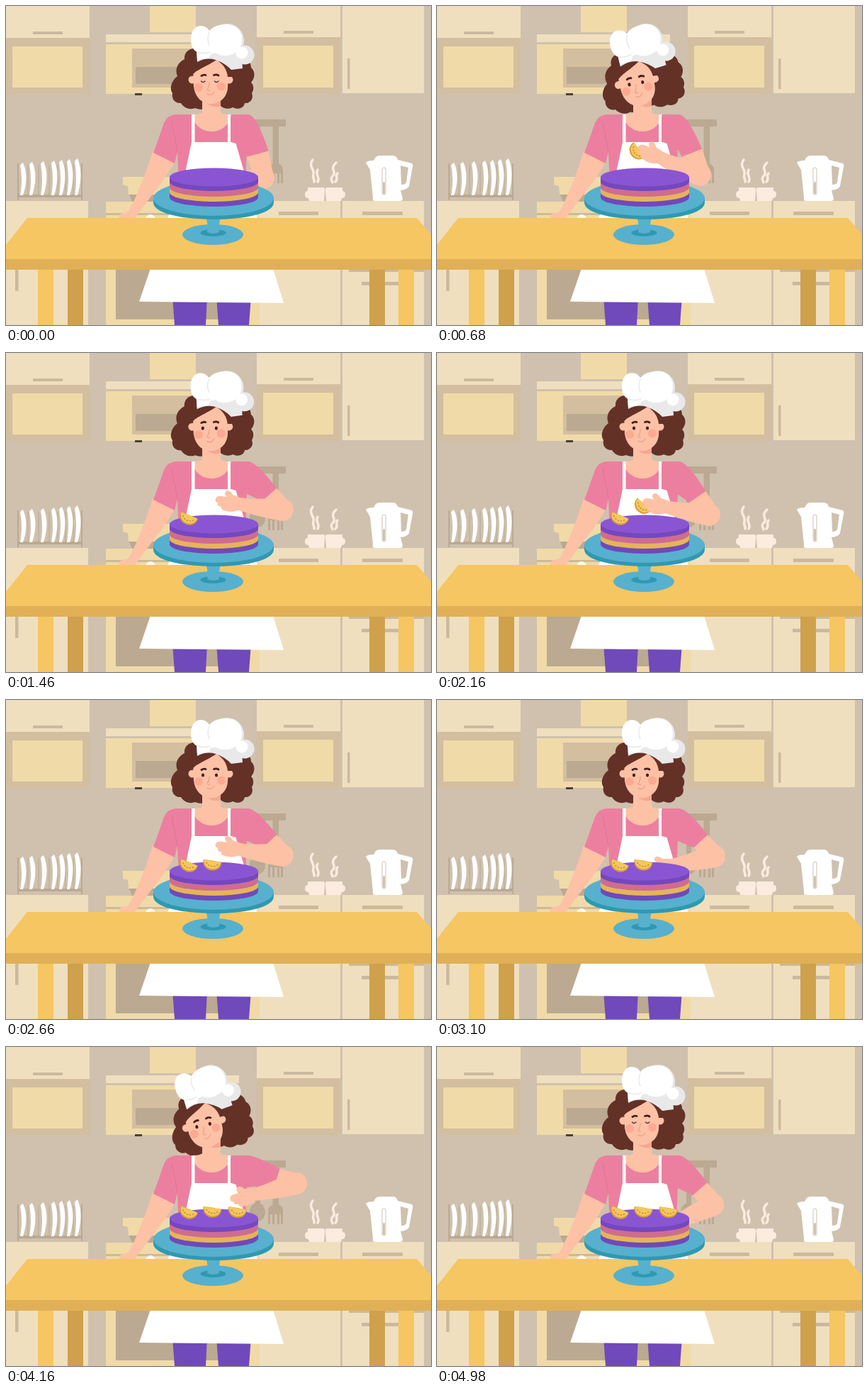
These frames come from a looping animation (600 px wide and 450 px high, 5 s). An HTML page:

```html
<!DOCTYPE html>
<html lang="en">
<head>
<meta charset="utf-8">
<title>Decorating a cake</title>
<style>
  html, body { margin: 0; width: 100%; height: 100%; overflow: hidden; background: #cfc1ae; }
  svg { display: block; width: 600px; height: 450px; }
  .line { fill: none; stroke-linecap: round; stroke-linejoin: round; }
</style>
</head>
<body>
<svg id="stage" viewBox="0 0 600 450">
  <defs>
    <g id="slice">
      <path fill="#d99f3b" d="M-13-1Q0-2 13-1C14 17-14 17-13-1Z"/>
      <path fill="#f5c75d" d="M-12-1H12C12 14-12 14-12-1Z"/>
      <path class="line" stroke="#bd8c35" stroke-width="1.5" stroke-dasharray="1 3.2" d="M-8 3C-4 8 4 8 8 3"/>
    </g>
    <path id="plate" d="M0 4Q2 1 4 0Q13 22 4 53H0Q4 28 0 4Z"/>
    <path id="cup" d="M3 0H25Q28 0 27 6L26 19H5L4 15Q-1 15-1 10Q-1 5 3 5Z"/>
  </defs>

  <!-- kitchen -->
  <rect width="600" height="450" fill="#cfc1ae"/>
  <path fill="#f0dfbe" d="M0 0H118V45H0ZM354 0H472V44H354ZM475 0H590V123H475ZM141 40H329V51H141ZM0 275H116V450H0ZM358 275H472V450H358ZM475 275H590V450H475Z"/>
  <path fill="#d3bea0" d="M0 45H118V124H0ZM354 44H472V124H354Z"/>
  <path fill="#f0daa8" d="M9 57H108V115H9ZM363 56H462V115H363ZM203 0H268V37H203ZM141 54H329V124H141ZM141 276H358V450H141Z"/>
  <path fill="#d3bea0" d="M178 60H300V115H178Z"/>
  <path fill="#bba991" d="M183 86H295V110H183ZM155 360H340V442H155Z"/>
  <path fill="#cbb99f" d="M38 36H80V40H38ZM392 35H434V39H392ZM482 74H485.500V117H482ZM13 370H17.500V402H13ZM385 290H441V295H385ZM503 290H560V295H503ZM484 372H590V375H484ZM502 389H560V394H502ZM141 292H240V295H141Z"/>
  <rect x="182" y="123" width="10" height="3" fill="#49403a"/>
  <path fill="#bba991" d="M173 264H230V276H178Z"/>
  <path fill="#f0daa8" d="M165 241H240V252L232 266H173L172 254L165 252Z"/>
  <circle cx="204" cy="301" r="7" fill="#fff8ec"/>

  <!-- hanging utensils -->
  <path fill="#bba991" d="M340 160H395V170H340ZM376.500 170H385V224H376.500ZM352 170H359V224H352ZM370 250V230Q372 222 381 222Q390 222 391 230V250H388V236H386V250H383V236H379V250H376V236H373V250Z"/>
  <ellipse cx="355" cy="233" rx="11" ry="13" fill="#bba991"/>

  <!-- dish rack -->
  <path fill="#bba991" d="M16 222H18V274H16ZM106 222H108V274H106ZM16 266H108V270H16Z"/>
  <path class="line" stroke="#bba991" d="M31 224V268M46 224V268M61 224V268M73 224V268M84 224V268M95 224V268"/>
  <g id="plates" fill="#fff"></g>

  <!-- cups and kettle -->
  <g fill="#fcebdf">
    <use href="#cup" transform="translate(423 256)"/>
    <use href="#cup" transform="translate(478 256) scale(-1 1)"/>
  </g>
  <path class="line" stroke="#fcebdf" stroke-width="3.500" d="M433 217C426 226 436 230 434 237C432 243 436 244 435 248M440 231C436 238 444 242 440 248M466 221C456 230 467 233 462 239C456 244 461 246 461 249M468 236C464 240 470 243 465 248"/>
  <path fill="#fff" fill-rule="evenodd" d="M522 213Q524 211 528 211H547Q552 212 553 217L573 222Q575 224 574 227L569 254Q567 259 557 260L560 272Q560 275 556 275H521Q517 275 518 270L514 231L508 221Q510 218 519 218ZM557 225L558 252Q564 252 565 249L568 228Z"/>
  <rect x="531" y="228" width="5" height="38" rx="2.500" fill="#fff" stroke="#cfc1ae"/>
  <rect x="532" y="248" width="3" height="17" rx="1.500" fill="#cfc1ae"/>

  <!-- baker -->
  <path id="hair" fill="#643127" d="M272 60C258 58 251 66 252 75C242 80 238 90 242 99C234 105 230 116 235 123C233 132 240 138 247 137C251 144 260 147 267 144C274 147 282 146 288 142L302 140C306 145 315 146 320 143C328 147 336 144 337 137C345 138 350 130 347 123C351 117 349 110 346 108C352 101 352 92 346 87C346 78 338 72 330 72Z"/>
  <path fill="#7049ba" d="M235 410H284L282 450H238ZM297 410H346L343 450H300Z"/>
  <path fill="#fdc1a6" d="M207 205L239 219C226 244 204 268 182 299L162 300Q157 296 162 293L173 290C187 263 198 234 207 205Z"/>
  <path fill="#ec7f9f" d="M239 153H343L340 196L336 300H246L242 206L238 222L208 207C214 192 219 176 223 165Q228 154 239 153Z"/>
  <path class="line" stroke="#dc7192" stroke-width=".8" d="M234 163L242 206"/>
  <path fill="#fdc1a6" d="M277 130H303V150Q304 153 318 153C312 185 269 185 262 153Q276 153 277 150Z"/>
  <path fill="#f5a791" d="M283 137Q295 141 303 132V141Q293 145 283 137Z"/>
  <path fill="#fff" d="M262 153H266.500V192H313V153H317V192H324L335 230L355 300L392 419L188 417L228 300L254 230L262 192Z"/>

  <g id="head">
    <circle cx="263" cy="104" r="5.500" fill="#fdc1a6"/>
    <circle cx="315" cy="104" r="5.500" fill="#fdc1a6"/>
    <path fill="#fdc1a6" d="M264 88Q270 72 291 73Q313 75 314 94L313 116C311 132 299 138 289 138C276 138 267 128 265 114Z"/>
    <circle cx="272" cy="115" r="6" fill="#fea992"/>
    <circle cx="304" cy="113.500" r="6" fill="#fea992"/>
    <path fill="#643127" d="M262 100C265 91 279 88 297 76C307 82 312 90 313 100L322 100L322 78L292 66L260 72Z"/>
    <path class="line" stroke="#43201b" stroke-width="2.800" d="M276 98.500Q279 96.500 282 97.500M293.500 97.500Q297 96 300 98"/>
    <path class="line" stroke="#ef9d87" stroke-width="1.200" d="M287 108Q287 114 284 118Q285 120 288 119M284 124Q290 128 294 121"/>
    <g id="open" fill="#3e211d">
      <ellipse cx="278" cy="106" rx="2.100" ry="2.600"/>
      <ellipse cx="297" cy="106" rx="2.100" ry="2.600"/>
    </g>
    <path id="shut" class="line" stroke="#54302a" stroke-width="1.300" d="M275.500 106Q278 109 281 106M294.500 106Q297 109 300 106"/>
    <g fill="#e9e9ea">
      <circle cx="337" cy="69" r="13.500"/>
      <circle cx="312" cy="49" r="24"/>
      <path d="M269 62L270 79Q283 72 296 76Q310 81 318 90L334 88L332 60Z"/>
    </g>
    <g fill="#fff">
      <circle cx="333" cy="66" r="8.500"/>
      <path d="M261 47C261 35 267 28 275 28Q283 28 287 35Q294 26 311 26C326 26 333 36 333 47C333 62 322 70 309 70Q300 70 296 66Q285 69 277 66C266 67 261 58 261 47Z"/>
      <path d="M269 60L270 77Q279 73 286 74L292 62Z"/>
    </g>
    <path class="line" stroke="#e9e9ea" stroke-width="1.500" d="M287 37Q283 46 287 55M271 65Q279 68 288 65"/>
  </g>

  <!-- table -->
  <path fill="#f5c661" d="M30 299H580L630 357H-16ZM45 372H67V450H45ZM554 372H576V450H554Z"/>
  <path fill="#cfa14d" d="M87 372H109V450H87ZM513 372H535V450H513Z"/>
  <rect y="357" width="600" height="15" fill="#e0b057"/>

  <g id="arm">
    <use id="held" href="#slice"/>
    <path id="upper" fill="#fdc1a6"/>
    <path id="sleeve" fill="#ec7f9f"/>
    <path id="fore" fill="#fdc1a6" d="M0-15C20-15 20 15 0 16C-20 16-45 13-62 10Q-72 16-84 13Q-88 11-86 9Q-94 9-92 4Q-98 3-96-2Q-95-6-88-6L-81-6Q-87-10-83-14Q-79-17-73-10L-62-8C-44-7-22-14 0-15Z"/>
  </g>

  <g id="stand">
    <ellipse cx="292" cy="322.500" rx="43" ry="14.500" fill="#57b0ce"/>
    <ellipse cx="292.500" cy="320" rx="18" ry="5" fill="#2f99b1"/>
    <path fill="#57b0ce" d="M282 298H303Q300 308 301 319Q292 323 284 319Q286 308 282 298Z"/>
    <path fill="#2f99b1" d="M208 271V277C208 309 378 309 378 277V271Z"/>
    <ellipse cx="293" cy="271" rx="85" ry="25" fill="#57b0ce"/>
    <g id="layers"></g>
    <ellipse cx="293.500" cy="241.500" rx="62.500" ry="13" fill="#8a55d3"/>
  </g>

  <g id="placed">
    <use href="#slice" transform="translate(258.500 230) rotate(22)"/>
    <use href="#slice" transform="translate(291.500 228) rotate(10)"/>
    <use href="#slice" transform="translate(327 228.500) rotate(10)"/>
  </g>
</svg>

<script>
const $ = id => document.getElementById(id);
const LOOP = 5000;

$('plates').innerHTML = [20, 33, 49, 64, 75, 86, 97]
  .map((x, i) => `<use href="#plate" transform="translate(${x} ${221 - i})scale(1 ${.87 + i * .018})"/>`).join('');
$('layers').innerHTML = [[270, '#7049ba'], [263, '#e5b45a'], [256, '#cf6c8f'], [248, '#7448bd']]
  .map(([y, fill]) => `<path fill="${fill}" d="M231 241V${y}A62.5 13 0 0 0 356 ${y}V241Z"/>`).join('');

// time, elbow x, elbow y, forearm angle
const armKeys = [
  [240, 364, 242, -6], [460, 382, 237, 2], [680, 372, 238, 24], [960, 356, 230, 2], [1040, 356, 230, 2],
  [1440, 391, 221, 8.5], [1500, 391, 221, 8.5], [1860, 389, 223, -16], [1960, 389, 223, -16],
  [2160, 385, 228, 11], [2380, 385, 222, -2], [2450, 385, 222, -2], [2640, 391, 219, 9],
  [2940, 392, 220, -10], [3100, 392, 220, -11], [3460, 392, 220, -23], [3740, 401, 207, -2],
  [3990, 410, 190, -21], [4040, 410, 190, -21], [4160, 410, 192, -14], [4280, 409, 193, -12],
  [4600, 399, 208, -10], [4900, 390, 222, -23]
];
const tiltKeys = [[240, 0], [900, 1], [1050, 1], [1500, 0], [3490, 0], [4150, 1], [4330, 1], [4900, 0]];
// pick up, come to the front, let go
const carries = [[240, 720, 980], [1900, 2180, 2400], [3460, 3800, 4010]];
const blinks = [[0, 40], [3240, 3400], [4880, LOOP]];

function pose(keys, t) {
  const i = keys.findIndex(k => k[0] > t);
  if (i === 0) return keys[0].slice(1);
  if (i < 0) return keys[keys.length - 1].slice(1);
  const a = keys[i - 1], b = keys[i];
  const u = (t - a[0]) / (b[0] - a[0]), e = u * u * (3 - 2 * u);
  return a.slice(1).map((v, j) => v + (b[j + 1] - v) * e);
}

const show = (el, on) => { el.style.display = on ? '' : 'none'; };

function drawArm(t) {
  const [x, y, angle] = pose(armKeys, t);
  const sx = 345, sy = 170, len = Math.hypot(x - sx, y - sy);
  const dx = (x - sx) / len, dy = (y - sy) / len;
  const side = (cx, cy, w) => `${cx + dy * w} ${cy - dx * w}`;
  const hx = sx + dx * 40, hy = sy + dy * 40, w = 17.5 - 6 * dx;
  const outer = side(hx, hy, w), inner = side(hx, hy, -w);
  $('upper').setAttribute('d', `M${outer}L${side(x, y, 14)}L${side(x, y, -14)}L${inner}Z`);
  $('sleeve').setAttribute('d', `M318 153H342Q354 154 ${outer}L${inner}L338 198L318 192Z`);
  const place = `translate(${x} ${y})rotate(${angle})`;
  $('fore').setAttribute('transform', place);
  $('held').setAttribute('transform', place + 'translate(-94 4)rotate(30)');
}

function draw(t) {
  drawArm(t);
  show($('held'), carries.some(([from, , to]) => t >= from && t < to));
  carries.forEach((c, i) => show($('placed').children[i], t >= c[2]));
  const front = carries.some(([, from, to]) => t >= from && t < to + 80);
  $('stage').insertBefore($('arm'), front ? $('placed') : $('stand'));

  const [a] = pose(tiltKeys, t), turn = -13.5 * a;
  $('head').setAttribute('transform', `translate(${-a} ${3.2 * a})rotate(${turn} 289 140)`);
  $('hair').setAttribute('transform', `translate(${-2 * a} ${3 * a})rotate(${turn} 289 104)`);

  const shut = blinks.some(([from, to]) => t >= from && t < to);
  show($('open'), !shut);
  show($('shut'), shut);
}

const start = performance.now();
function tick() {
  draw((performance.now() - start) % LOOP);
  requestAnimationFrame(tick);
}
tick();
</script>
</body>
</html>
```
